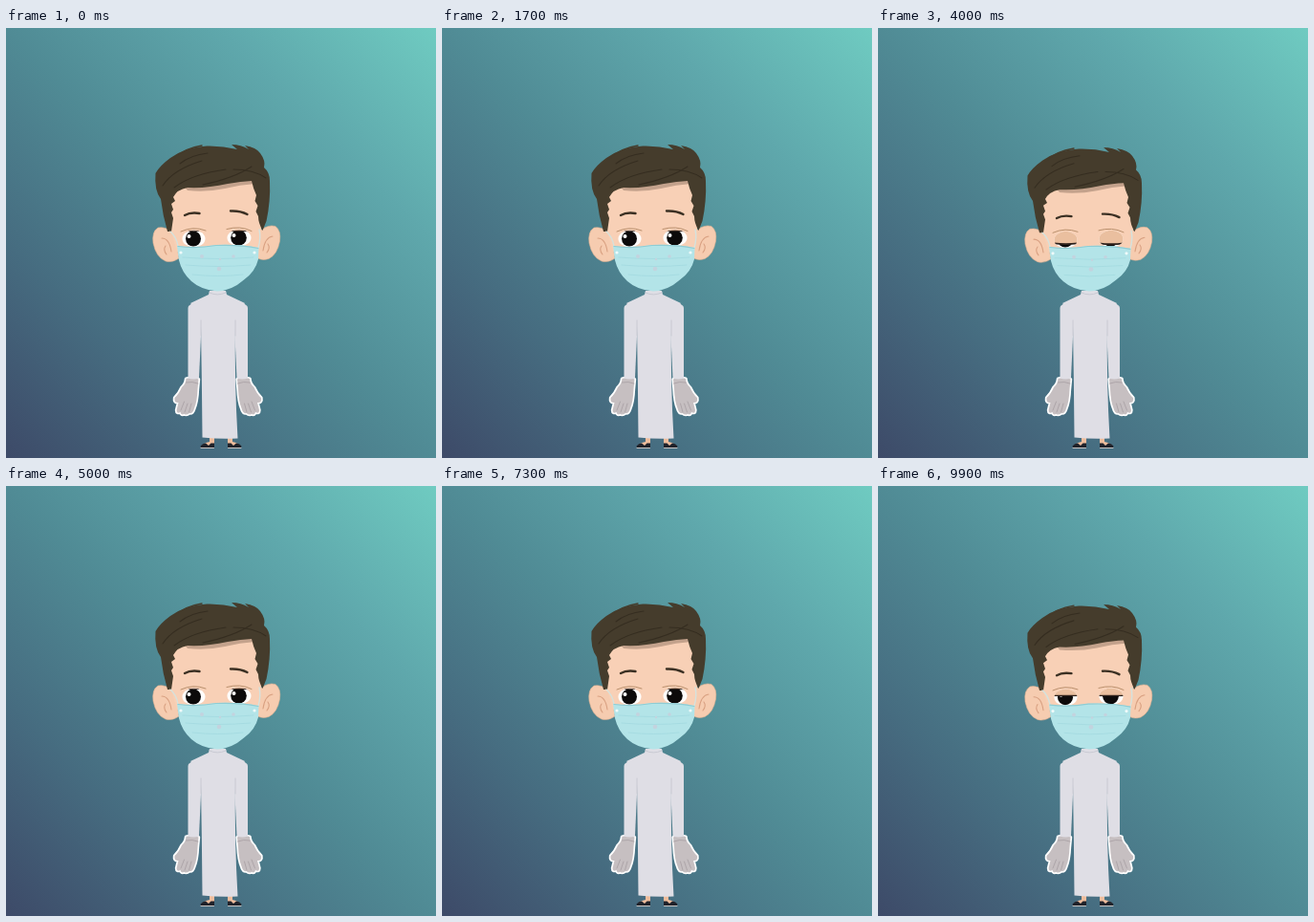
An HTML page that plays this animation: 450 by 450 pixels, repeating every 10 s.

```html
<!DOCTYPE html>
<html lang="en">
<head>
<meta charset="utf-8">
<title>Boy with mask</title>
<style>
html, body { margin: 0; width: 100%; height: 100%; overflow: hidden; background: #508b95; }
svg { display: block; width: 100%; height: 100%; }
</style>
</head>
<body>
<svg viewBox="0 0 450 450" stroke-linecap="round" stroke-linejoin="round">
  <defs>
    <linearGradient id="sky" gradientUnits="userSpaceOnUse" x1="0" y1="450" x2="450" y2="0">
      <stop offset="0" stop-color="#3d4a68"/>
      <stop offset=".25" stop-color="#466c80"/>
      <stop offset=".5" stop-color="#508b95"/>
      <stop offset=".75" stop-color="#5fa8ac"/>
      <stop offset="1" stop-color="#6fcbc1"/>
    </linearGradient>
    <clipPath id="clipL"><ellipse cx="196.500" cy="220.500" rx="12" ry="9"/></clipPath>
    <clipPath id="clipR"><ellipse cx="244" cy="219.500" rx="12.500" ry="9"/></clipPath>
    <g id="glove">
      <path d="M188.500 367Q195 365 201.500 367.500L200.500 378Q200 391 197 398Q195.500 404 192 403Q189 405.500 186.500 404Q183 405.500 182.500 402Q178.500 404 178.500 400L180.500 392Q175.500 392.500 176.500 387Q181 383 184 376Q188 373 188.500 367Z" fill="#c6bfc1" stroke="#fff" stroke-width="3.400" paint-order="stroke"/>
      <path d="M183 400L186.500 391M187 402L190 393M191.500 402L194 393M188.500 371Q195 369.500 201 372" fill="none" stroke="#a29a9e" stroke-width=".7"/>
    </g>
    <g id="sleeve">
      <path d="M205 284Q191 288 190.500 293V366.500Q196 368.500 202 366.500L204.500 312Z"/>
    </g>
    <g id="foot">
      <path d="M213 427H218V437Q210 439 204.500 437.500Q207 434 213 433Z" fill="#eebd9d"/>
      <path d="M203.500 437.500Q206 434.500 209 434.500L212 437L214.500 434.500H218V439H204Z" fill="#20222a"/>
      <path d="M204 439.500H217.500" stroke="#d7cfca" stroke-width=".9"/>
    </g>
  </defs>

  <rect width="450" height="450" fill="url(#sky)"/>

  <g id="body">
    <use href="#foot"/>
    <use href="#foot" transform="translate(450 0) scale(-1 1)"/>
    <use href="#glove"/>
    <use href="#glove" transform="translate(443.500 0) scale(-1 1)"/>
    <g fill="#dfdee5">
      <use href="#sleeve"/>
      <use href="#sleeve" transform="translate(443.500 0) scale(-1 1)"/>
      <path d="M213 275H230L231 279L250 288Q242 296 240 312Q239 370 242.500 429.500Q224 430.500 205.500 428.500Q205 370 204 312Q202 296 193 288L212 279Z"/>
    </g>
    <path d="M204 306V322M240 306V322" stroke="#c3c4ce" stroke-width=".8"/>
    <path d="M213 277Q221 281 230 277" fill="none" stroke="#c9cad3"/>
  </g>

  <g id="head">
    <g fill="#f6ccb0" stroke="#e6b493" stroke-width=".6">
      <path d="M176 216Q168 207 159 209Q152.500 213 154 225Q157 240 167 244Q174 246 181 241Z"/>
      <path d="M265 213Q274 205 282 207.500Q288 212 286.500 223Q284 237 275 241.500Q267 244 262 240Z"/>
    </g>
    <path d="M163 220Q171 220 173 234M167 228Q164 232 168 237M279 218Q271 219 269 233M274 226Q277 230 273 235" fill="none" stroke="#d9a182" stroke-width="1.100"/>
    <path d="M172 168L258 156Q268 180 267 214L263 243Q248 272 221 274Q195 273 182 243L173 214Z" fill="#f8d0b6"/>

    <g id="hair">
      <path d="M186 165Q214 161 257 157L261 163Q245 164 229 168Q210 172 190 170Z" fill="#c4a28c"/>
      <path d="M169 213Q164 196 162 179Q155 170 156.500 152Q161 144 172 136Q188 124.500 210 123.500Q226 123 242 127L236 122Q246 122 254 127L250 123Q262 125 266 131Q272 139 270 146Q276 151 276 160Q277 181 272.500 202L268.500 212Q264 204 264 197L261.500 192L263.500 186L260.500 181L262 175Q259 169 257 160Q246 160.500 232 163Q210 168 190 167Q179 169 175 177L177 181L173 184L175 190L173 193L175 199L173 213Z" fill="#453c2c"/>
      <path d="M175 137Q186 126 205 123" fill="none" stroke="#453c2c" stroke-width="1.400"/>
      <path d="M164 165Q175 148 205 139M176 167Q194 153 230 148M206 164Q239 157 257 145M238 148Q259 148 272 157M182 142Q193 133 211 131" fill="none" stroke="#352d20" stroke-width="1.100"/>
    </g>

    <g id="brows" fill="none" stroke="#3b3023" stroke-width="2.400">
      <path d="M187 196Q193 192.500 202.500 194"/>
      <path d="M235 191.500Q245 191 252.500 195"/>
    </g>

    <g clip-path="url(#clipL)">
      <rect x="183" y="208" width="28" height="26" fill="#fffdfb"/>
      <circle cx="196" cy="220.500" r="8" fill="#0c0a0a"/>
      <circle cx="191.500" cy="218" r="2" fill="#fff"/>
      <path class="lid" data-x="196.500" fill="#eabf9f" stroke="#2e211b"/>
    </g>
    <g clip-path="url(#clipR)">
      <rect x="229" y="207" width="29" height="26" fill="#fffdfb"/>
      <circle cx="243.500" cy="219.500" r="8.300" fill="#0c0a0a"/>
      <circle cx="238.500" cy="217" r="2" fill="#fff"/>
      <path class="lid" data-x="244" fill="#eabf9f" stroke="#2e211b"/>
    </g>
    <path d="M183 213Q196 207 209 212M231 210.500Q245 206.500 257 212.500" fill="none" stroke="#b98f6c" stroke-width="1"/>

    <g id="mask">
      <path d="M180 228Q178 218 172 213M264 230Q267 220 265 211" fill="none" stroke="#d5e2dd" stroke-width="1.400"/>
      <path d="M179 228Q199 230.500 220 227Q245 226 264.500 230L264 242Q261 255 249 263.500Q236 275 221 275.500Q204 274 194 265Q184 256 181 243Z" fill="#b3e4e8"/>
      <path d="M180 228.500Q199 231 220 227.500Q245 226.500 264 230.500" fill="none" stroke="#8fccd3" stroke-width="1.200"/>
      <path d="M185 240Q222 243 259 240M188 248Q222 251 256 248M195 258Q222 261 248 258" fill="none" stroke="#a3dae0" stroke-width=".8"/>
      <g fill="#c3d3de">
        <circle cx="205" cy="239" r="2"/><circle cx="223" cy="252" r="2.300"/>
        <circle cx="238" cy="239" r="1.800"/><circle cx="224" cy="242" r="1.200"/>
      </g>
      <g fill="#effafa"><circle cx="183" cy="235" r="1.600"/><circle cx="260" cy="235" r="1.600"/></g>
    </g>
  </g>
</svg>
<script>
const LOOP = 10000, STEP = 100, CHIN = 280;
const blinks = [100, 3800, 6800, 9800];
// One value per 100 ms of a blink.
const lidKeys = [.06, .5, 1, .9, .4, 0];
const dipKeys = [.1, .7, 1, .75, .3, 0, -.3, -.4, -.3, -.15, -.05];

const head = document.getElementById('head');
const brows = document.getElementById('brows');
const lids = document.querySelectorAll('.lid');

function pose(t) {
  let lid = 0, dip = 0;
  for (const start of blinks) {
    const k = Math.round((t - start) / STEP);
    lid += lidKeys[k] || 0;
    dip += dipKeys[k] || 0;
  }
  return { lid, dip };
}

function draw(time) {
  const t = Math.floor((time % LOOP) / STEP) * STEP;
  const { lid, dip } = pose(t);
  head.setAttribute('transform', `translate(0 ${CHIN}) scale(1 ${1 - .019 * dip}) translate(0 ${-CHIN})`);
  brows.setAttribute('transform', `translate(0 ${1.5 * Math.max(0, dip)})`);
  for (const el of lids) {
    const x = +el.dataset.x, y = 213 + 11 * lid, bend = 4 * (lid - .4);
    el.setAttribute('d', `M${x - 15} 200V${y}Q${x} ${y + bend} ${x + 15} ${y}V200Z`);
    el.setAttribute('stroke-width', 1 + .8 * lid);
  }
}

const begin = performance.now();
function tick(now) {
  draw(Math.max(0, now - begin));
  requestAnimationFrame(tick);
}
draw(0);
requestAnimationFrame(tick);
</script>
</body>
</html>
```
